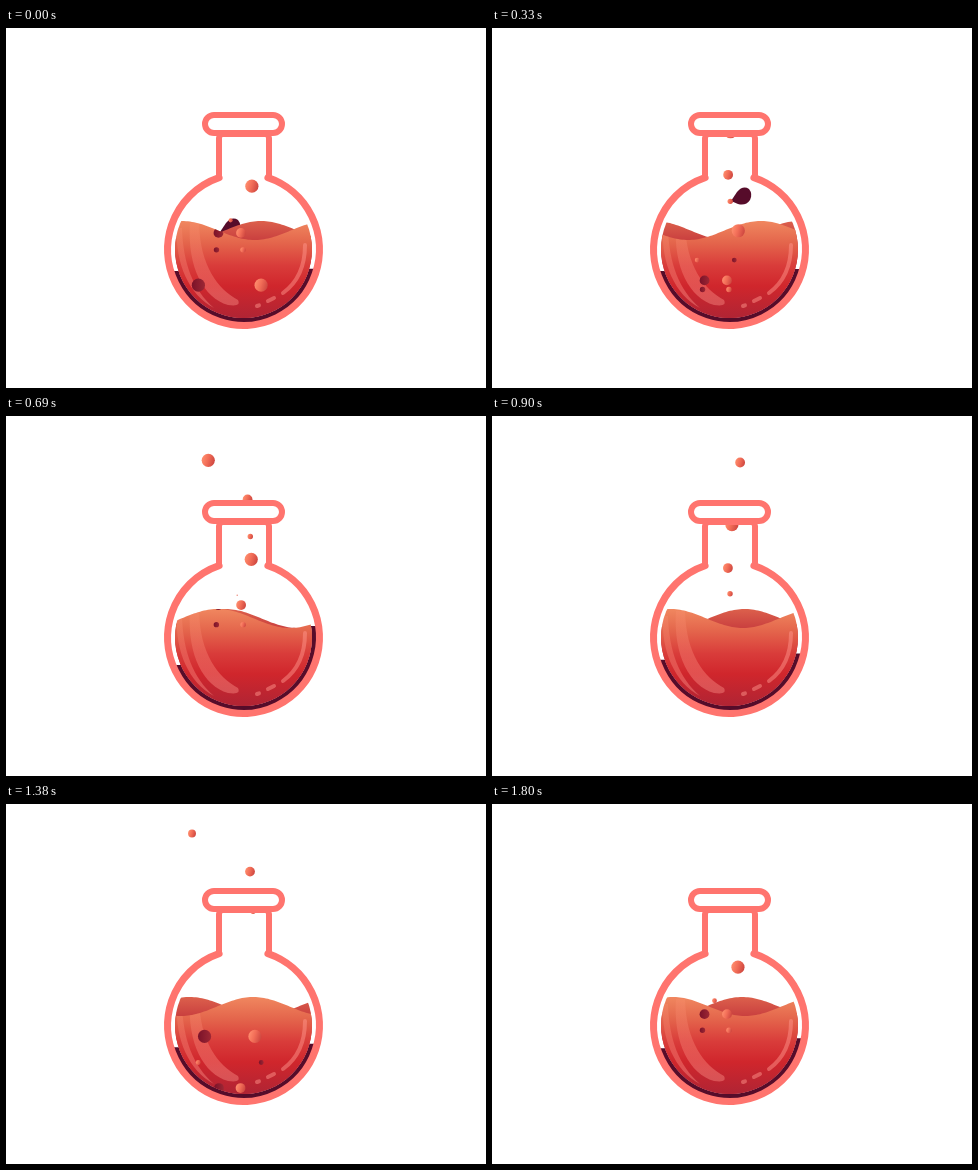
Write an HTML page with a canvas that moves like this. It is 480 by 360 pixels and loops after 1.83 s.

```html
<!DOCTYPE html>
<html lang="en">
<head>
<meta charset="utf-8">
<title>Bubbling flask</title>
<style>
html, body { margin: 0; width: 100%; height: 100%; overflow: hidden; background: #fff; }
canvas { display: block; width: 480px; height: 360px; }
</style>
</head>
<body>
<canvas id="stage" width="480" height="360"></canvas>
<script>
const ctx = document.getElementById('stage').getContext('2d');
const LOOP = 1830, STEP = 30, TAU = Math.PI * 2;
const CX = 237.5, CY = 221.5;
const WAVE = 145, MIRROR = 447.5;
const PINK = '#ff746e', MAROON = '#560c2a';

// x, y: position at MID age; rise, drift: px per ms; bend: sideways swerve
const MID = 680;
const bubbles = [
  { x: 246, y: 178, r: 6.6, rise: .165, drift: 0, bend: -60, born: 0, dies: 1670 },
  { x: 235, y: 226, r: 4.9, rise: .176, drift: 0, bend: 9, born: 295, dies: 1910 },
  { x: 237, y: 239.5, r: 2.7, rise: .147, drift: 0, bend: 10, born: 380, dies: 1910 },
  { x: 216, y: 210, r: 2.4, rise: .147, drift: .072, bend: 0, born: 260, dies: 930 }
];

function place(b, age) {
  const d = age - MID;
  const grow = Math.min(1, (age - b.born) / 50, (b.dies - age) / 150);
  return {
    x: b.x + b.drift * d + b.bend * (d / 900) ** 3,
    y: b.y - b.rise * d,
    r: b.r * Math.max(0, grow)
  };
}

function disc(x, y, r, fill) {
  ctx.beginPath();
  ctx.arc(x, y, r, 0, TAU);
  ctx.fillStyle = fill;
  ctx.fill();
}

function gradient(x0, y0, x1, y1, ...stops) {
  const g = ctx.createLinearGradient(x0, y0, x1, y1);
  stops.forEach(([at, color]) => g.addColorStop(at, color));
  return g;
}

function clipDisc(r) {
  ctx.beginPath();
  ctx.arc(CX, CY, r, 0, TAU);
  ctx.clip();
}

function clipWave(crest) {
  ctx.beginPath();
  ctx.moveTo(160, 300);
  for (let x = 160; x <= 316; x += 2) {
    ctx.lineTo(x, 202.5 - 9.5 * Math.cos((x - crest) / WAVE * TAU));
  }
  ctx.lineTo(316, 300);
  ctx.clip();
}

// Dark film on the glass; its right side climbs as the wave pulls away
function drawLiner(crest) {
  const climb = Math.max(0, Math.cos((crest - 212) / WAVE * TAU));
  const left = 243 + 6 * climb, right = 241 - 31 * climb;
  ctx.save();
  ctx.beginPath();
  ctx.rect(155, left, CX - 155, 305 - left);
  ctx.rect(CX, right, 320 - CX, 305 - right);
  ctx.clip();
  disc(CX, CY, 74, MAROON);
  ctx.restore();
}

function fillStage(paint) {
  ctx.fillStyle = paint;
  ctx.fillRect(150, 180, 180, 125);
}

function drawShine() {
  ctx.fillStyle = gradient(0, 195, 0, 265,
    [0, 'rgba(255,150,120,.2)'], [1, 'rgba(255,150,140,.4)']);
  ctx.fill(new Path2D('M184 195C181 240 198 270 222 277Q236 279 232 272C212 261 194 238 193 195Z'));
  ctx.fill(new Path2D('M171 200C169 235 183 267 208 280C187 262 177 235 176 200Z'));
  ctx.strokeStyle = 'rgba(255,150,140,.48)';
  ctx.lineCap = 'round';
  ctx.lineWidth = 4;
  ctx.stroke(new Path2D('M299 217Q299 249 277 265M262 273L268 270M251 278L253 277.3'));
}

function drawLiquid(front, back, ages) {
  ctx.save();
  clipDisc(68.5);
  ctx.save();
  clipWave(back);
  fillStage(gradient(0, 193, 0, 255, [0, '#dc604c'], [.4, '#c4363b'], [1, '#b3202f']));
  ctx.restore();
  clipWave(front);
  fillStage(gradient(0, 193, 0, 290, [0, '#f0875f'], [.22, '#e4664c'],
    [.46, '#d93c3a'], [.67, '#d0262c'], [1, '#b02434']));
  drawShine();
  eachBubble(ages, drawShadow);
  ctx.restore();
}

function eachBubble(ages, paint) {
  ages.forEach(age => bubbles.forEach(b => paint(place(b, age))));
}

// Dark twin of a bubble inside the liquid; a big one opens a notch at the surface
function drawShadow({ x, y, r }) {
  x = MIRROR - x;
  disc(x, y, r, gradient(x - r, y, x + r, y, [0, '#7a1229'], [1, '#9d2734']));
  if (r > 6 && y < 201) disc(x, y - 1.5, r - .5, '#fff');
}

function drawBubble({ x, y, r }) {
  disc(x, y, r, gradient(x - r, y - r * .3, x + r, y + r * .3,
    [0, '#ff8e6e'], [.45, '#f26e58'], [1, '#cc443e']));
}

function drawSplash(t) {
  if (t > 390) return;
  const u = t / 330;
  ctx.save();
  ctx.translate(225 + 25 * u, 199 - 31 * u);
  ctx.fillStyle = MAROON;
  ctx.fill(new Path2D('M-11 5L-5 -4Q1 -11 7 -7Q11 -2 8 4Q4 10 -4 8Z'));
  ctx.restore();
}

function drawFlask() {
  const open = Math.asin(24.5 / 75.9), top = -Math.PI / 2;
  ctx.strokeStyle = PINK;
  ctx.lineJoin = ctx.lineCap = 'round';
  ctx.lineWidth = 7.2;
  ctx.beginPath();
  ctx.arc(CX, CY, 75.9, top + open, top - open + TAU);
  ctx.stroke();
  ctx.lineWidth = 6;
  ctx.beginPath();
  ctx.moveTo(213, 149);
  ctx.arcTo(213, 106, 238, 106, 4);
  ctx.arcTo(263, 106, 263, 149, 4);
  ctx.lineTo(263, 149);
  ctx.stroke();
  ctx.beginPath();
  ctx.roundRect(199, 87, 77, 18, 9);
  ctx.fillStyle = '#fff';
  ctx.fill();
  ctx.stroke();
}

function draw(t) {
  const drift = 2 * WAVE * t / LOOP;
  const front = 176 - drift, back = 255 + drift;
  const ages = [(t + 800) % LOOP, t + 200];
  ctx.fillStyle = '#fff';
  ctx.fillRect(0, 0, 480, 360);
  drawLiner(front);
  // white disc keeps the space above the liquid clear of the film
  disc(CX, CY, 68.5, '#fff');
  drawSplash(t);
  drawLiquid(front, back, ages);
  eachBubble(ages, drawBubble);
  drawFlask();
}

const start = performance.now();
function tick() {
  const t = (performance.now() - start) % LOOP;
  draw(Math.floor(t / STEP) * STEP);
  requestAnimationFrame(tick);
}
tick();
</script>
</body>
</html>
```
